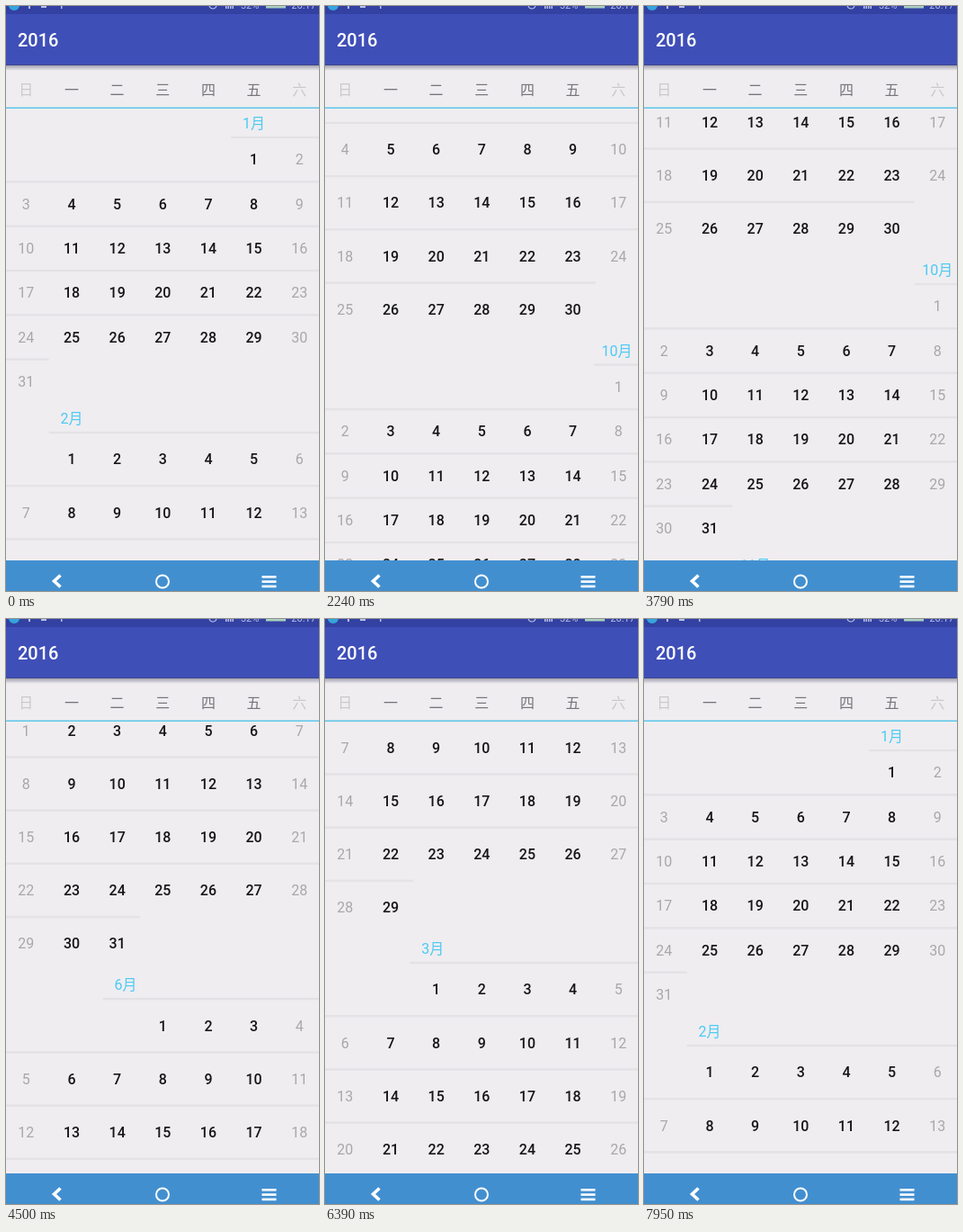
Write an HTML page with a canvas that moves like this. It is 348x650 px and loops after 8 s.

```html
<!DOCTYPE html>
<html lang="zh">
<head>
<meta charset="utf-8">
<style>
html, body { margin: 0; width: 348px; height: 650px; overflow: hidden; background: #efedf0; }
canvas { display: block; }
</style>
</head>
<body>
<canvas id="stage" width="348" height="650"></canvas>
<script>
const ctx = document.getElementById('stage').getContext('2d');
const FONT = 'Roboto, "Noto Sans CJK SC", "Noto Sans CJK", sans-serif';
const LOOP = 8000, COL = 50.65, LEFT = -3;
const TOP = 114, BOTTOM = 616, MONTH = 328, HEAD = 32, GRID = MONTH - HEAD;
const SLIDE = 600, SLIDE_FROM = -330;

const months = Array.from({ length: 12 }, (_, m) => {
  const first = new Date(2016, m, 1).getDay();
  const days = new Date(2016, m + 1, 0).getDate();
  return { first, days, rows: Math.ceil((first + days) / 7) };
});

const ease = (t, t0, t1, a, b, power) => {
  const p = Math.min(1, Math.max(0, (t - t0) / (t1 - t0)));
  return b + (a - b) * (1 - p) ** power;
};

// List offset: fling down the year, then two flings back up
function scrollAt(t) {
  if (t < 577) return 0;
  if (t < 3650) return 2850 * (1 - Math.exp((577 - t) / 566));
  if (t < 3790) return 2838 - 46 * ((t - 3650) / 140) ** 2;
  if (t < 5800) return ease(t, 3790, 5250, 2792, 1032, 2.5);
  return ease(t, 5820, 7450, 1032, 0, 2.085);
}

const topOf = (m, t) => TOP + m * MONTH - scrollAt(t);
const visible = (m, t) => {
  const y = topOf(m, t);
  return y < BOTTOM && y + MONTH > TOP;
};

// Month headings slide in from the left once their month appears
function slideX(m, t) {
  let age = 0;
  while (age < SLIDE && visible(m, t - age)) age += 4;
  return SLIDE_FROM * (1 - Math.min(1, age / SLIDE)) ** 2;
}

const colX = c => LEFT + c * COL;
const midX = c => colX(c + 0.5);

function text(s, x, y, color, size = 16, weight = 400, align = 'center') {
  ctx.font = `${weight} ${size}px ${FONT}`;
  ctx.textAlign = align;
  ctx.fillStyle = color;
  ctx.fillText(s, x, y);
}

function rect(x, y, w, h, color) {
  ctx.fillStyle = color;
  ctx.fillRect(x, y, w, h);
}

function circle(x, y, r) {
  ctx.beginPath();
  ctx.arc(x, y, r, 0, 7);
}

function drawMonth(m, t) {
  const { first, days, rows } = months[m];
  const y = topOf(m, t), rowH = GRID / rows, dx = slideX(m, t);
  text(`${m + 1}月`, midX(first) + dx, y + 22, '#4bcaf4');
  for (let r = 0; r < rows; r++) {
    const from = r ? LEFT : colX(first) + dx;
    const to = colX(Math.min(7, first + days - r * 7));
    rect(from, y + HEAD - 1.2 + r * rowH, to - from, 2.4, '#e4e2e5');
  }
  for (let d = 1; d <= days; d++) {
    const i = first + d - 1, c = i % 7, weekend = c % 6 === 0;
    const mid = y + HEAD + (Math.floor(i / 7) + 0.5) * rowH;
    text(d, midX(c), mid + 5.7, weekend ? '#a9a7aa' : '#161616', 16, weekend ? 400 : 500);
  }
}

function drawHeader() {
  rect(0, 0, 348, 66, '#3f4fb8');
  rect(0, 0, 348, 9, '#3341a2');
  const shade = ctx.createLinearGradient(0, 65, 0, 72);
  shade.addColorStop(0, 'rgba(60,60,90,.5)');
  shade.addColorStop(1, 'rgba(60,60,90,0)');
  rect(0, 65, 348, 7, shade);
  text('2016', 13, 45, '#fff', 20, 500, 'left');

  // Clipped status bar
  circle(9, -1, 6);
  ctx.fillStyle = '#35a5dc';
  ctx.fill();
  const pale = '#b9bfe4';
  rect(25, 0, 2, 3, pale);
  rect(39, 0, 6, 2, pale);
  rect(61, 0, 1.5, 3, pale);
  ctx.strokeStyle = pale;
  ctx.lineWidth = 1.2;
  circle(230, -1, 4);
  ctx.stroke();
  for (let i = 0; i < 4; i++) rect(244 + i * 2.5, 0, 1.5, 3, pale);
  rect(289, 0, 22, 2.5, '#a9cfc0');
  text('52%', 271, 3, pale, 11);
  text('20:17', 331, 3, pale, 11);

  [...'日一二三四五六'].forEach((s, c) =>
    text(s, midX(c), 98.5, c % 6 ? '#77757a' : '#cac8cb'));
  rect(0, 112.5, 348, 1.5, '#5cc6ea');
}

function drawNav() {
  rect(0, BOTTOM, 348, 34, '#428fd0');
  ctx.strokeStyle = '#fff';
  ctx.lineWidth = 3.6;
  ctx.beginPath();
  ctx.moveTo(60.5, 632.5);
  ctx.lineTo(53.5, 639);
  ctx.lineTo(60.5, 645.5);
  ctx.stroke();
  ctx.lineWidth = 2;
  circle(174, 639.5, 7);
  ctx.stroke();
  for (let i = 0; i < 3; i++) rect(284.5, 633 + i * 5.3, 16, 2.6, '#fff');
}

function draw(now) {
  const t = now % LOOP;
  rect(0, 0, 348, 650, '#efedf0');
  ctx.save();
  ctx.beginPath();
  ctx.rect(0, TOP - 1, 348, BOTTOM - TOP + 1);
  ctx.clip();
  months.forEach((_, m) => visible(m, t) && drawMonth(m, t));
  ctx.restore();
  drawHeader();
  drawNav();
}

const start = performance.now();
function tick() {
  draw(performance.now() - start);
  requestAnimationFrame(tick);
}
tick();
</script>
</body>
</html>
```
